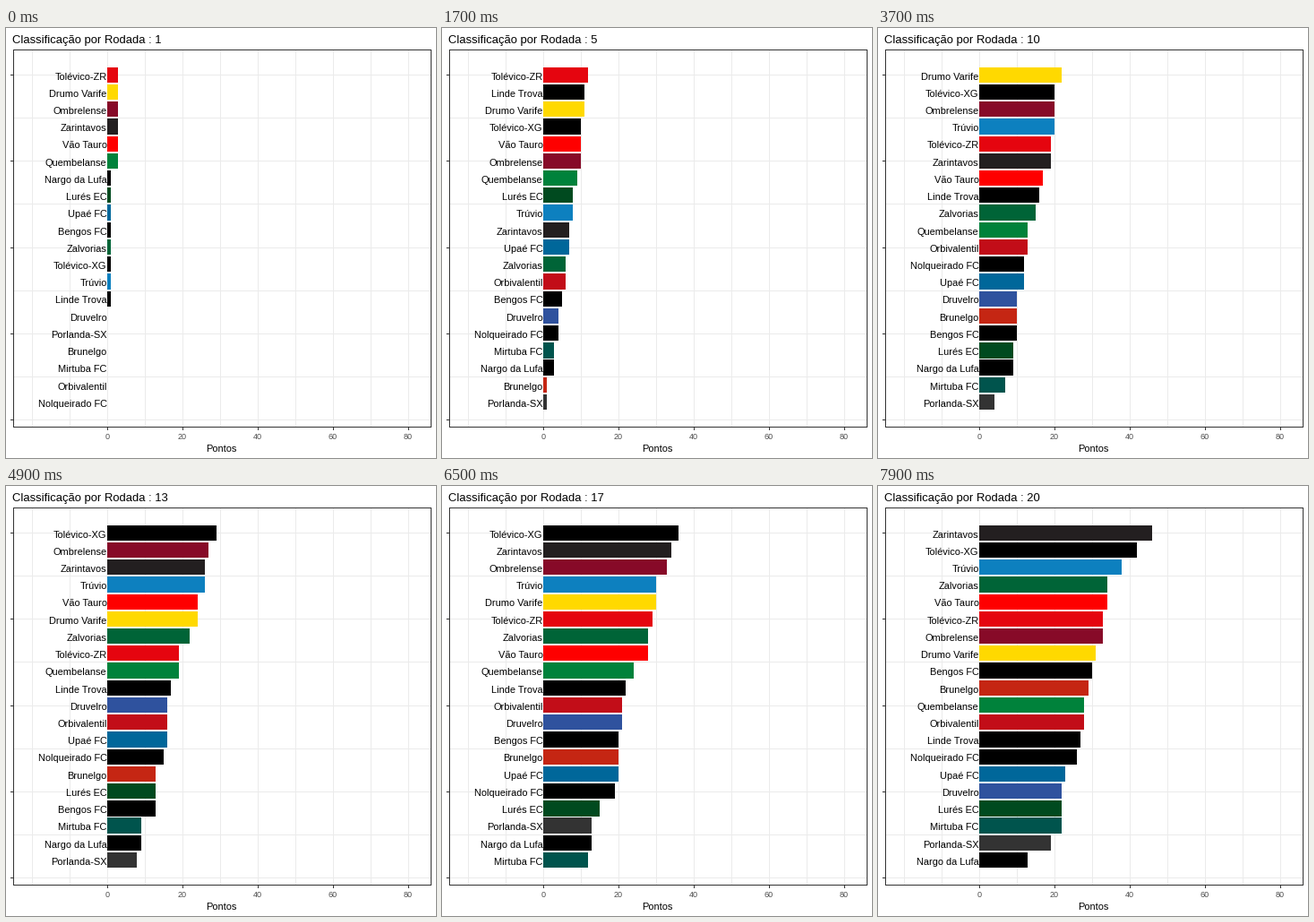
A matplotlib script that plays this animation: 480 by 480 pixels, repeating every 8 s.

```python
import matplotlib.pyplot as plt
from matplotlib.animation import FuncAnimation
from matplotlib.patches import Rectangle

SIZE, DPI = 480, 100
FRAMES, INTERVAL = 80, 100
ROUNDS, TOTAL_FRAMES = 38, 150      # the full season, of which this shows a part
LEFT, TOP, RIGHT, BOTTOM = 8, 24, 475, 446
X0, POINT = 112.8, 4.2              # pixels: zero line and one point
Y0, ROW = 52.26, 19.225             # pixels: first row centre and row pitch
GRID, DARK = "#ebebeb", "#333333"

# key: name, colour, results by round (W win, D draw, L loss)
CLUBS = {
    "a": ("Tolévico-ZR", "#e5050f", "WLWWWWLLDWLLLWWWDLDWL"),
    "s": ("Drumo Varife", "#ffd900", "WDWDWDWWDWDDLWDDDLDLL"),
    "f": ("Ombrelense", "#870a28", "WLDWWDWLWWDWWLWLWLLLL"),
    "c": ("Zarintavos", "#231f20", "WWDLLWWLWWDWWWDWDWWWW"),
    "u": ("Vão Tauro", "#fe0000", "WLWDWWWDLLDWWLWLDWLLW"),
    "h": ("Quembelanse", "#00823b", "WLWLWLLWDLWLWLWDDDWLL"),
    "v": ("Nargo da Lufa", "#000000", "DDDLLLLLWWLLLWLLDLLLL"),
    "g": ("Lurés EC", "#004a1f", "DWWDLDLLLLDLWLDLDDWWL"),
    "i": ("Upaé FC", "#00679a", "DLWWLDWDLLLDWDLLWLLLW"),
    "n": ("Bengos FC", "#000000", "DWLDLDDWLLLLWLDWWDWWW"),
    "p": ("Zalvorias", "#006437", "DDLWDLLWWWWDWWWLLLWLW"),
    "m": ("Tolévico-XG", "#000000", "DWLWWLDWWWWWWLWWDLLWW"),
    "r": ("Trúvio", "#0d80bf", "DLWDWLWWWWLWWLDLWWWDD"),
    "t": ("Linde Trova", "#000000", "DWDWWDLWDLDLLDLDWWDLD"),
    "z": ("Druvelro", "#2f529e", "LLDLWWWLLLWLWDLDWDLLL"),
    "j": ("Porlanda-SX", "#333333", "LDLLLLLWLLDWLDLWDLWWL"),
    "l": ("Brunelgo", "#c52613", "LDLLLWWLLWLWLWDWLWLWW"),
    "b": ("Mirtuba FC", "#00544d", "LWLLLLLDWLDDLDDDLWWDW"),
    "e": ("Orbivalentil", "#c20d18", "LWDDDWLLWDLLWDWDLWDLW"),
    "k": ("Nolqueirado FC", "#000000", "LDLWLWWDLDWLLWLDLDLWW"),
}

# table order after each round, best first
TABLES = """
asfcuhvginpmrtzjlbek cmsgntabhufevpjilrkz sgcuahtmnirfevbplzjk
astgmuicfhpnrekbvzlj atsmufhgrcipenzkbvlj autsfmcehgrizkpnlbvj
usafctmrizkhegnlpbvj suatmrfchiknzpeglbjv smrfucathpeikzngblvj
smfracutphekizlngvbj msfrcaputhkzeinlgvbj msfrcupathkzielgnbvj
mfcruspahtzeiklgnbvj mcsfrpuahktezilngvbj mcfpsurahetkzlingvbj
mcfsapurhelktznigjvb mcfrsapuhteznlikgjvb cmrfusaphtelznkigbjv
cmrfpusahtenlzkigbjv cmrfapushntlekzgibjv cmrpuafsnlhetkizgbjv
""".split()

SCORE = {"W": 3, "D": 1, "L": 0}

plt.rcParams["font.family"] = "Liberation Sans"
fig = plt.figure(figsize=(SIZE / DPI, SIZE / DPI), dpi=DPI, facecolor="white")
ax = fig.add_axes([0, 0, 1, 1])
ax.set_xlim(0, SIZE)
ax.set_ylim(SIZE, 0)
ax.axis("off")


def box(x0, y0, x1, y1, color, z):
    patch = Rectangle((x0, y0), x1 - x0, y1 - y0, facecolor=color,
                      linewidth=0, antialiased=False, zorder=z)
    return ax.add_patch(patch)


def label(x, y, text, px, color="black", ha="left"):
    return ax.text(x, y, text, fontsize=px * 72 / DPI, color=color,
                   ha=ha, va="baseline", zorder=5)


def px_x(points):
    return round(X0 + POINT * points)


def px_y(row):
    return round(Y0 + ROW * row)


def draw_panel():
    for points in range(-20, 81, 10):
        x = px_x(points)
        box(x, TOP, x + 1, BOTTOM, GRID, 1)
        if points >= 0 and points % 20 == 0:
            box(x, BOTTOM, x + 1, BOTTOM + 3, DARK, 4)
            label(x, 459, str(points), 9, "#4d4d4d", "center")
    for half_step in range(9):
        y = px_y(2.5 * half_step)
        box(LEFT, y, RIGHT, y + 1, GRID, 1)
        if half_step % 2 == 0:
            box(LEFT - 3, y, LEFT, y + 1, DARK, 4)
    for x in (LEFT, RIGHT - 1):
        box(x, TOP, x + 1, BOTTOM, DARK, 4)
    for y in (TOP, BOTTOM - 1):
        box(LEFT, y, RIGHT, y + 1, DARK, 4)
    label(240.3, 473, "Pontos", 11, ha="center")


draw_panel()
title = label(7.4, 17, "", 13)
bars, names = [], []
for row in range(len(CLUBS)):
    y0, y1 = px_y(row - 0.45), px_y(row + 0.45)
    bars.append(box(px_x(0), y0, px_x(0), y1, "black", 3))
    baseline = round(Y0 + ROW * row + 5.3)
    names.append(label(112.6, baseline, "", 11, ha="right"))


def draw(n):
    # the title follows the bars one frame late
    played = max(0, (ROUNDS * n - 1) // TOTAL_FRAMES)
    shown = max(0, ROUNDS * (n - 1) // TOTAL_FRAMES)
    title.set_text(f"Classificação por Rodada : {shown + 1}")
    for key, bar, name in zip(TABLES[played], bars, names):
        club, color, results = CLUBS[key]
        points = sum(SCORE[r] for r in results[:played + 1])
        bar.set_width(px_x(points) - px_x(0))
        bar.set_facecolor(color)
        name.set_text(club)
    return [title, *bars, *names]


anim = FuncAnimation(fig, draw, frames=FRAMES, interval=INTERVAL,
                     repeat=True, repeat_delay=0, blit=False)
plt.show()
```
